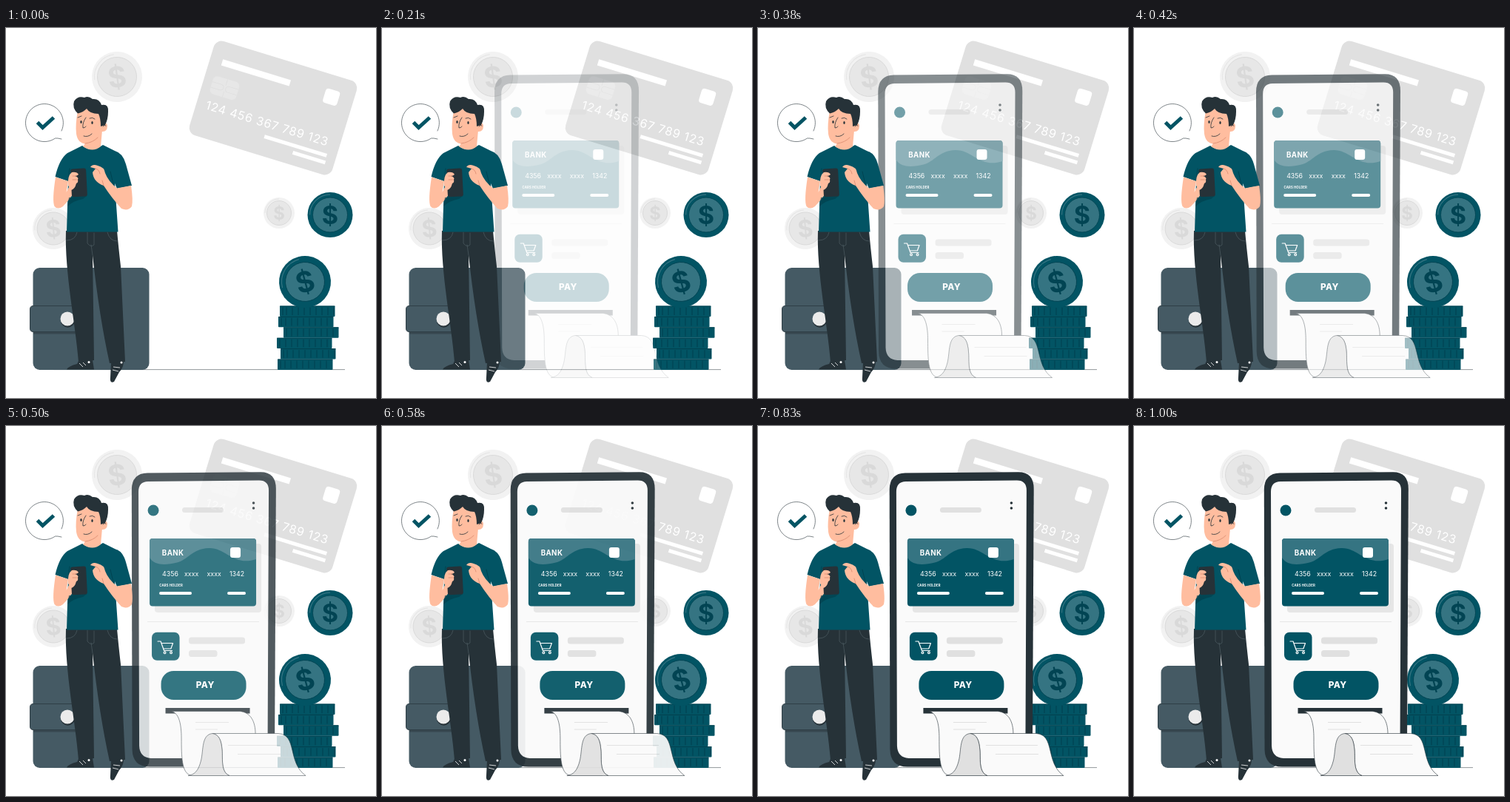
An HTML page that plays this animation: 500 by 500 pixels, repeating every 1040 ms.

```html
<!DOCTYPE html>
<html lang="en">
<head>
<meta charset="utf-8">
<title>Mobile payment</title>
<style>
html, body { margin: 0; width: 100%; height: 100%; overflow: hidden; background: #fff; }
svg { display: block; width: 100vw; height: 100vh; font-family: Inter, "Open Sans", sans-serif; }
.teal { fill: #025464; }
.ink { fill: #263238; }
.pale { fill: #e0e0e0; }
.white { fill: #fff; }
.skin { fill: #ffbd9f; }
.line { fill: none; stroke: #263238; stroke-width: .8; stroke-linecap: round; stroke-linejoin: round; }
.sheet { fill: #fafafa; stroke: #263238; stroke-width: .6; }
</style>
</head>
<body>
<svg viewBox="0 0 500 500">
  <path d="M64 461.6H458" stroke="#263238" stroke-width=".5"/>
  <g id="paleCoins"></g>

  <!-- credit card -->
  <g transform="translate(361 108) rotate(17)" class="white">
    <rect class="pale" x="-101" y="-66.5" width="202" height="133" rx="11"/>
    <rect x="-84" y="-43" width="96" height="8.5"/>
    <rect x="61" y="-47" width="20" height="20" rx="4"/>
    <rect x="-89" y="-19" width="37" height="25" rx="6" fill="#e7e7e7"/>
    <path d="M-89-10h12q5 0 5 4t-5 4h-12M-52-10h-12q-5 0-5 4t5 4h12M-70-19v9M-70-2v8" fill="none" stroke="#e0e0e0"/>
    <text x="-88" y="28" font-size="16" letter-spacing=".8">124 456 367 789 123</text>
    <rect x="0" y="38" width="88" height="5"/>
    <rect x="43" y="47.5" width="46" height="5"/>
  </g>

  <!-- wallet -->
  <rect x="36.500" y="324" width="157" height="138" rx="9" fill="#455a64"/>
  <path d="M37 411.500H95" stroke="#37474f" stroke-width="4"/>
  <path d="M95 375.500H37Q32.500 375.500 32.500 380V406Q32.500 410.500 37 410.500H95" fill="#455a64" stroke="#2f3e46"/>
  <circle class="ink" cx="83.500" cy="395" r="9.700"/>
  <circle cx="83" cy="393" r="9.500" fill="#ebebeb"/>

  <g id="tealCoins"></g>

  <!-- phone and receipt -->
  <g id="phone">
    <path class="ink" d="M197 63.500L350 62.300Q370.800 62.300 370.800 85L369 438Q368.500 460.500 347 460.500H200Q177 460.500 176.500 437L175.800 86Q176 64 197 63.500Z"/>
    <path fill="#fafafa" d="M198 75L348 73.500Q361 73.500 361 87L359.500 435Q359 449 345 449H202Q186.500 448 186 432L185 89Q185 75 198 75Z"/>
    <circle class="teal" cx="205" cy="114" r="7.500"/>
    <rect class="pale" x="244" y="110" width="56" height="7" rx="3.500"/>
    <path d="M340.500 104v14" stroke="#263238" stroke-width="3.600" stroke-linecap="round" stroke-dasharray="0 7"/>
    <rect x="207" y="159" width="144" height="93" rx="4" fill="#e6e6e6"/>
    <rect class="teal" x="200" y="152" width="144" height="91.500" rx="4"/>
    <path fill="#357482" d="M200 178V156Q200 152 204 152H340Q344 152 344 156V180C313 190 303 164 280 165S252 181 237 184.500S207 189 200 178Z"/>
    <g class="white">
      <text x="216.800" y="174.600" font-size="9.700" font-weight="700" letter-spacing=".4">BANK</text>
      <rect x="309" y="164" width="14" height="14" rx="3"/>
      <g id="digits" font-size="8.800"></g>
      <text x="213.300" y="217" font-size="4.300" font-weight="700" letter-spacing=".1">CARS HOLDER</text>
      <rect x="213" y="224" width="44" height="4" rx="2"/>
      <rect x="305" y="224" width="25" height="4" rx="2"/>
    </g>
    <path d="M197 264.500H348" stroke="#e6e6e6"/>
    <rect class="teal" x="203" y="278.700" width="37.500" height="38" rx="7"/>
    <g fill="none" stroke="#fff" stroke-width="1.200" stroke-linecap="round" stroke-linejoin="round">
      <path d="M211 291h4l4.500 12.500h11M216 293.500h15.500l-2.700 7.500h-10"/>
      <circle cx="220.500" cy="306.300" r="1.400"/><circle cx="229" cy="306.300" r="1.400"/>
    </g>
    <rect class="pale" x="253" y="285.500" width="76" height="9" rx="3.500"/>
    <rect class="pale" x="253" y="303" width="38.500" height="9" rx="3.500"/>
    <rect class="teal" x="215.500" y="331" width="115" height="39" rx="17"/>
    <text class="white" x="275.200" y="354.300" font-size="11.800" font-weight="800" letter-spacing=".4" text-anchor="middle">PAY</text>
    <path class="ink" d="M221.500 381H335.500V388.500H221.500Z"/>
    <path class="sheet" d="M229 385.500H322C337 387 343 400 343 416V440L300 472H256C243 470 243 445 243 422C243 404 240 387 229 385.500Z"/>
    <path class="sheet" d="M285 415.500H374C400 417 386 455 411 472.500H308C296 468 299 450 298 438C297 425 294 417 285 415.500Z"/>
    <path d="M285 415.500C270 417 273 437 269.500 452C266 466 261 471 252 472.500H308C296 468 299 450 298 438C297 425 294 417 285 415.500Z" fill="#e0e0e0" stroke="#263238" stroke-width=".6"/>
    <path d="M262 400.500h45M262 410h30M306 431.500h70M319 443.500h58" stroke="#e0e0e0"/>
  </g>

  <!-- speech bubble -->
  <path d="M75 150Q69 148.500 66.500 149A25.500 25.500 0 1 1 72.500 143Q71 147 75 150" fill="#fff"/>
  <path d="M75 150Q69 148.500 66.500 149A25.500 25.500 0 1 1 75 139" class="line" style="stroke-width:.6"/>
  <path d="M42.500 127.500l7 7L64.500 121" fill="none" stroke="#025464" stroke-width="5"/>

  <!-- man -->
  <path class="ink" d="M81 274H150Q152 296 155 322L161 451L140 453Q126 390 117 307L119 449L98 451C94 400 79 330 81 274Z"/>
  <path class="line" style="stroke:#55636a;stroke-width:.6" d="M82 287Q94 287 96 276M137 276Q140 288 150 288M110 276V291Q115 297 119 293V277M117 307L115 293"/>
  <path class="ink" d="M98 450L117 449L119 461.500H82Q84 457 96 454Z"/>
  <path class="ink" d="M142 452L159 450Q159 459 153 465L146 478Q140 481 141 472Z"/>
  <path d="M99 453l5 5M104 452l4 4M144 462l8 2M145 458l9 1" stroke="#fff" stroke-width=".8"/>
  <circle class="white" cx="112" cy="451.500" r="1.500"/><circle class="white" cx="156" cy="452" r="1.500"/>
  <path class="teal" d="M103 159Q115 169 131 158L147 166Q158 169 162 184L170 213L150 217L147 210L151.500 275.500H82L84 207L66.500 201Q72 177 83 169Z"/>
  <path class="skin" d="M67 201.500L84 207L81.500 222L89 207L97 214Q88 230 77 241Q70 246 65.500 241Q62 233 67 201.500Z"/>
  <path d="M84 206L86 190M146 215L141 194" class="line" style="stroke:#013f4c"/>
  <path fill="#013f4c" opacity=".65" d="M85 229L109 227L104 231Q92 233 83 241Z"/>
  <path class="skin" d="M150 216.500L169 213Q172 233 170 241Q165 248 156 244Q143 230 132 213Q118 208 117 195L121 190L114 188Q117 183 124 186Q133 188 134 196Q138 207 150 216.500Z"/>
  <path class="line" style="stroke:#d98b70" d="M121 190Q126 191 127 197M132 213L130 206"/>
  <rect class="ink" x="88" y="190" width="21" height="38" rx="3" transform="rotate(-3 98 209)"/>
  <path class="skin" d="M84 213Q83 199 89 195Q96 194 98 198Q96 200 93 200Q99 202 97 205Q98 209 95 210Q93 218 88 219Z"/>
  <path class="line" style="stroke:#d98b70" d="M90 200l5 0M90 205l6 0"/>

  <path class="skin" d="M105 147L130 138L128 160Q117 169 104 160Q108 157 107 150Z"/>
  <path class="skin" d="M97 112Q93.500 130 95 143Q97 156 108 156.500Q123 156 129 140Q137 141 137 132Q136 126 130 129L129 108Q112 100 97 112Z"/>
  <path class="ink" d="M97 115.500Q89 108 92 99Q97 91 106 94Q111 91 117 96Q126 95 129 104Q139 102 138 113Q138 123 134 131L128 133Q128 122 125 116Q113 116 109 109Q104 114 97 115.500Z"/>
  <path class="line" d="M108 121Q103 128 104 135Q107 135 108 133M105 146Q111 148 116 143M97 121l5-2M113 122q4-2 7 1M131 133q2-3 4-1"/>
  <ellipse class="ink" cx="101.500" cy="127" rx="1.200" ry="1.900"/><ellipse class="ink" cx="116.500" cy="128" rx="1.200" ry="1.900"/>
  <path d="M107 156Q117 155 124 148" class="line" style="stroke:#d98b70"/>
</svg>
<script>
const byId = id => document.getElementById(id);

const coin = (x, y, r, inner, tilt, [rim, face, sign]) => `
  <g transform="translate(${x} ${y}) rotate(${tilt})">
    <circle r="${r}" fill="${rim}"/>
    <circle r="${inner}" fill="${face}" stroke="${sign}" stroke-width=".9"/>
    <path d="M${-r * .9} 0A${r * .9} ${r * .9} 0 0 1 0 ${-r * .9}" fill="none" stroke="${face}" stroke-width="1.200"/>
    <text y="${inner * .52}" font-size="${inner * 1.45}" font-weight="700" text-anchor="middle" fill="${sign}">$</text>
  </g>`;

const pale = ["#f2f2f2", "#e7e7e7", "#d9d9d9"];
const teal = ["#025464", "#357482", "#024453"];
byId("paleCoins").innerHTML =
  coin(150, 66, 34, 26.5, -8, pale) + coin(64, 271, 28, 22, -5, pale) + coin(369, 250, 21, 16.5, 0, pale);

// Stacked coins, given by their left edges from top to bottom
const stack = [370, 368, 375, 366, 371, 367].map((x, i) => {
  const y = 375.5 + i * 14.4;
  let ridges = "";
  for (let dx = 4; dx < 74; dx += 5 + (dx * 3 + i) % 4) ridges += `M${x + dx} ${y + 2}v10.500`;
  return `<rect x="${x}" y="${y}" width="74.500" height="14.400" rx="1" fill="${teal[0]}"/>
    <path d="${ridges}M${x} ${y + .5}h74.500" stroke="#013c49" stroke-width=".8"/>`;
}).join("");
byId("tealCoins").innerHTML =
  stack + coin(438, 252.5, 30.5, 23.5, 0, teal) + coin(404, 343, 35, 26.5, -15, teal);

byId("digits").innerHTML = [[217, "4356"], [247, "xxxx"], [277.5, "xxxx"], [308, "1342"]]
  .map(([x, s]) => `<text x="${x}" y="202.500">${s}</text>`).join("");

// Cubic bezier easing, solved by bisection
const bez = (a, b, s) => 3 * (1 - s) ** 2 * s * a + 3 * (1 - s) * s * s * b + s ** 3;
function ease(t) {
  if (t >= 1) return 1;
  let lo = 0, hi = 1;
  for (let i = 0; i < 30; i++) {
    const mid = (lo + hi) / 2;
    if (bez(.36, .5, mid) < t) lo = mid; else hi = mid;
  }
  return bez(-.01, 1.38, lo);
}

const phone = byId("phone"), LOOP = 1040, STEP = 1000 / 24;
const start = performance.now();
function draw() {
  const ms = (performance.now() - start) % LOOP;
  const step = Math.floor((ms + 4) / STEP);
  const p = step < 2 ? 0 : ease((step + .75) / 24);
  phone.setAttribute("transform", `translate(${30 * (p - 1)} 0)`);
  phone.setAttribute("opacity", Math.max(0, Math.min(1, p)));
  requestAnimationFrame(draw);
}
draw();
</script>
</body>
</html>
```
